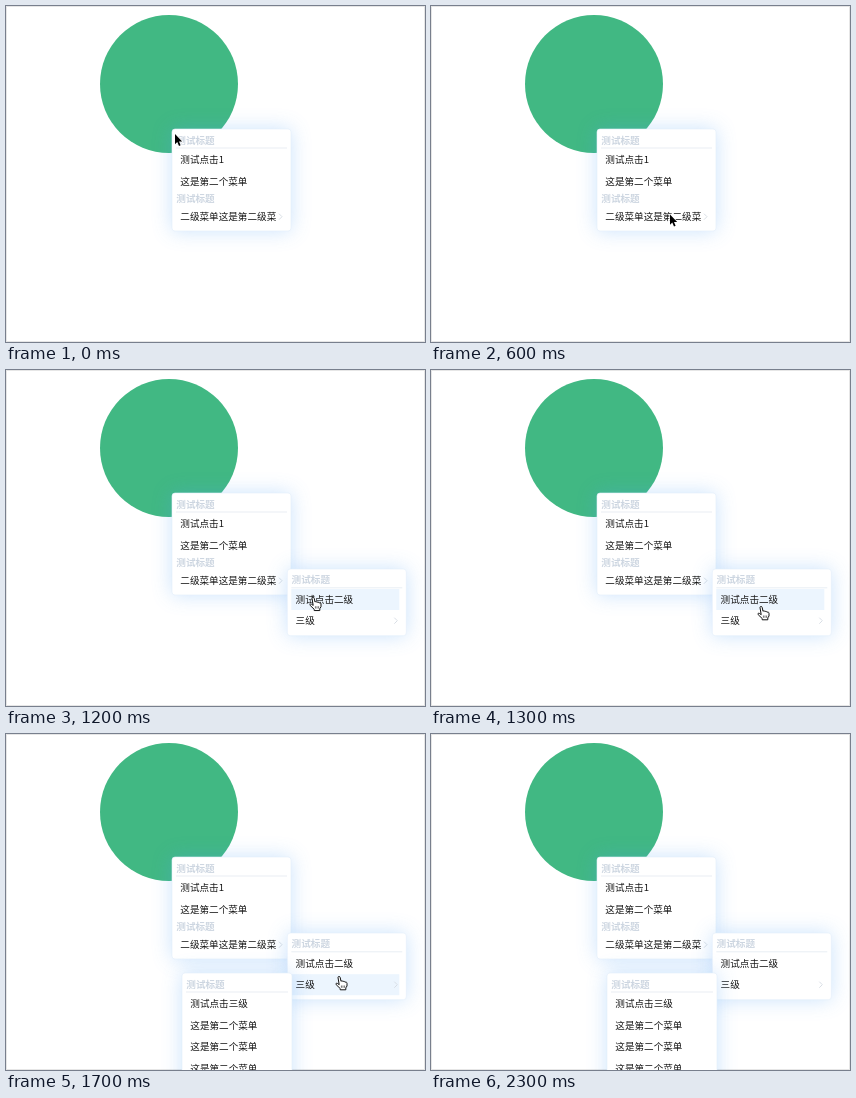
Write an HTML page with a canvas that moves like this. It is 419 px wide and 336 px high and loops after 2400 ms.

```html
<!DOCTYPE html>
<html lang="zh-CN">
<head>
<meta charset="utf-8">
<title>多级菜单</title>
<style>
  html, body { margin: 0; width: 100%; height: 100%; overflow: hidden; background: #fff; }
  canvas { display: block; }
</style>
</head>
<body>
<canvas id="stage" width="419" height="336"></canvas>
<script>
const ctx = document.getElementById('stage').getContext('2d');
const LOOP = 2400, STEP = 100;
const FONT = '"Noto Sans CJK SC", "Noto Sans CJK", "Noto Sans", sans-serif';

const title = (y, text, ruled) => ({ y, text, title: true, ruled });
const row = (y, text, more) => ({ y, text, more });

const root = { x: 166, y: 123, w: 119, h: 102, items: [
  title(134, '测试标题', true), row(153.5, '测试点击1'), row(175, '这是第二个菜单'),
  title(192, '测试标题'), row(210.7, '二级菜单这是第二级菜', true)
] };
const second = { x: 281.3, y: 199, w: 119, h: 66.7, items: [
  title(209.8, '测试标题', true), row(229.5, '测试点击二级'), row(250.7, '三级', true)
] };
const third = { x: 176, y: 239, w: 110, h: 120, items: [
  title(250, '测试标题', true), row(269.5, '测试点击三级'), row(291, '这是第二个菜单'),
  row(312.5, '这是第二个菜单'), row(334, '这是第二个菜单')
] };

// pointer tip: time, x, y
const path = [
  [0, 169, 128], [200, 196, 163], [300, 196, 163], [600, 239, 208.5],
  [800, 239, 208.5], [900, 239, 211.5], [1100, 284, 218], [1300, 330, 236.5],
  [1400, 333, 242.5], [1900, 333, 242.5], [2300, 345, 340]
];

const arrow = new Path2D('M0 0V10.2L2.3 8.1L4 12L5.6 11.3L4 7.5H7.2Z');
const hand = new Path2D('M-1 1C-1-.4 1-.4 1.2 1L2 4.8C2.6 4 3.8 4.2 4 5.2' +
  'C4.6 4.5 5.8 4.8 6 5.8C6.8 5.2 8 5.7 8 6.8V9.5L6.8 11.4V13.3H1.2V12' +
  'L-2.8 8.2C-3.6 7-2.4 6.2-1.4 7L.2 8.2Z');
const creases = new Path2D('M2.4 9V11.3M4 9V11.3M5.6 9V11.3');

function pointAt(t) {
  let i = 0;
  while (i < path.length - 2 && t > path[i + 1][0]) i++;
  const [t0, x0, y0] = path[i], [t1, x1, y1] = path[i + 1];
  const k = (t - t0) / (t1 - t0);
  return [x0 + (x1 - x0) * k, y0 + (y1 - y0) * k];
}

function chevron(x, y) {
  ctx.strokeStyle = '#d5dbe3';
  ctx.lineWidth = 0.9;
  ctx.beginPath();
  ctx.moveTo(x, y - 3);
  ctx.lineTo(x + 3, y);
  ctx.lineTo(x, y + 3);
  ctx.stroke();
}

function drawMenu(m, active) {
  ctx.save();
  ctx.shadowColor = 'rgba(80, 160, 245, 0.3)';
  ctx.shadowBlur = 20;
  ctx.fillStyle = '#fff';
  ctx.beginPath();
  ctx.roundRect(m.x, m.y, m.w, m.h, 3);
  ctx.fill();
  ctx.restore();
  ctx.strokeStyle = '#e3eefa';
  ctx.lineWidth = 0.6;
  ctx.stroke();

  m.items.forEach((it, i) => {
    if (i === active) {
      ctx.fillStyle = '#ecf5fe';
      ctx.fillRect(m.x + 4, it.y - 10.5, m.w - 11, 21);
    }
    if (it.ruled) {
      ctx.fillStyle = '#e9eef4';
      ctx.fillRect(m.x + 4, it.y + 7.5, m.w - 8, 1);
    }
    if (it.more) chevron(m.x + 107, it.y);
    ctx.font = (it.title ? 'bold ' : '') + '9.6px ' + FONT;
    ctx.fillStyle = it.title ? '#cdd6e1' : '#161616';
    ctx.fillText(it.text, m.x + (it.title ? 4.3 : 8.3), it.y + 3.6);
  });
}

function drawPointer(t) {
  const [x, y] = pointAt(t);
  const isHand = t >= 900 && t < 2000;
  ctx.save();
  ctx.translate(x, y);
  ctx.lineJoin = 'round';
  if (isHand) {
    ctx.fillStyle = '#fff';
    ctx.fill(hand);
    ctx.strokeStyle = '#111';
    ctx.lineWidth = 1;
    ctx.stroke(hand);
    ctx.lineWidth = 0.6;
    ctx.stroke(creases);
  } else {
    ctx.strokeStyle = '#fff';
    ctx.lineWidth = 1.4;
    ctx.stroke(arrow);
    ctx.fillStyle = '#000';
    ctx.fill(arrow);
  }
  ctx.restore();
}

function draw(t) {
  ctx.fillStyle = '#fff';
  ctx.fillRect(0, 0, 419, 336);
  ctx.strokeStyle = '#e6e6e6';
  ctx.lineWidth = 1;
  ctx.strokeRect(0.5, 0.5, 418, 335);

  ctx.fillStyle = '#41b883';
  ctx.beginPath();
  ctx.arc(163, 78, 69, 0, Math.PI * 2);
  ctx.fill();

  drawMenu(root, t >= 900 && t < 1100 ? 4 : -1);
  if (t >= 900) {
    const active = t < 1200 || t >= 2000 ? -1 : t < 1400 ? 1 : 2;
    drawMenu(second, active);
  }
  if (t >= 1400) drawMenu(third, -1);
  drawPointer(t);
}

const start = performance.now();
function tick() {
  const t = (performance.now() - start) % LOOP;
  draw(Math.floor(t / STEP) * STEP);
  requestAnimationFrame(tick);
}
tick();
</script>
</body>
</html>
```
